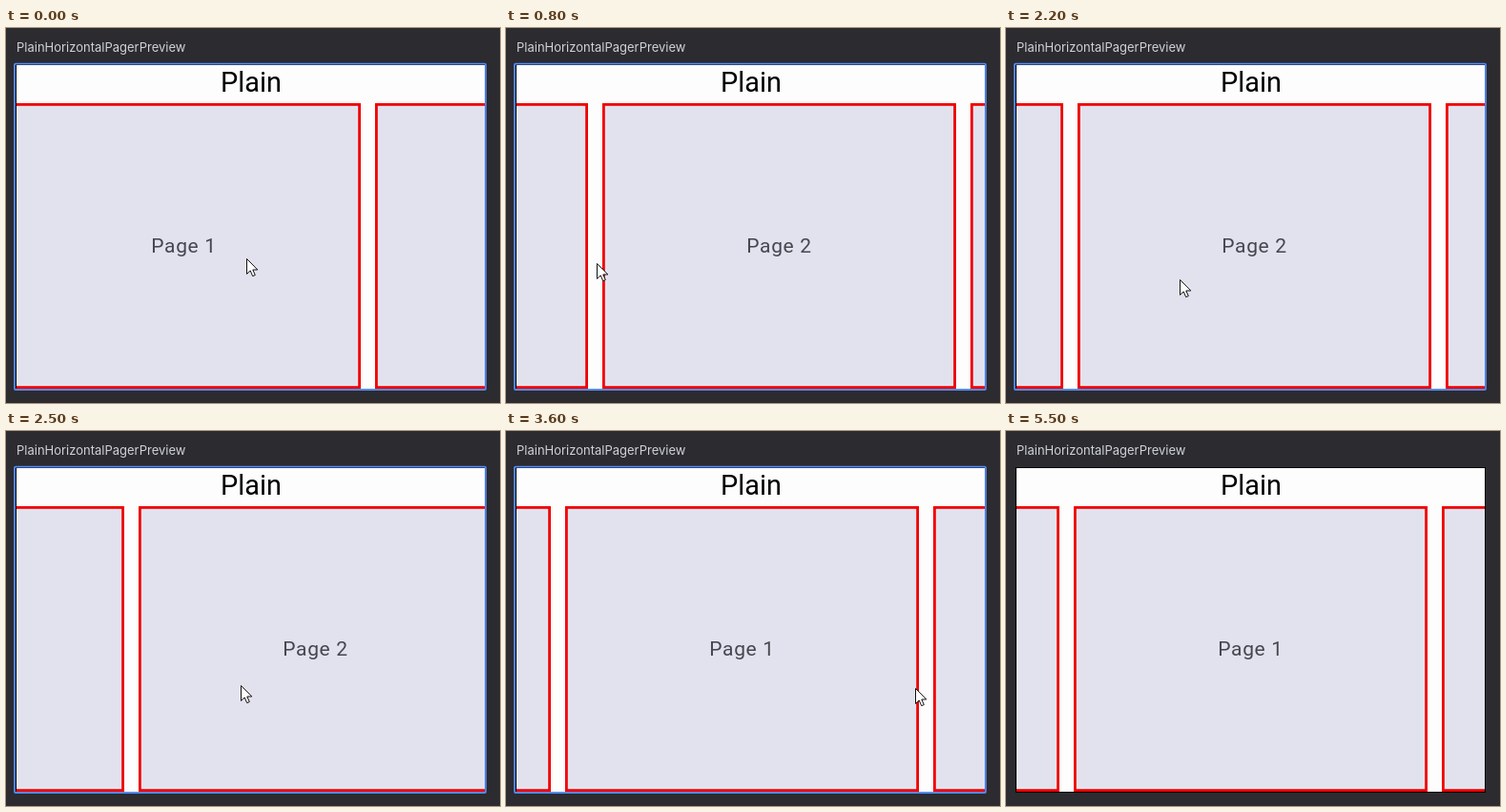
Write an HTML page that moves like this. It is 518 px wide and 394 px high and loops after 5.6 s.

```html
<!DOCTYPE html>
<html lang="en">
<head>
<meta charset="utf-8">
<title>Pager preview</title>
<style>
  html, body { margin: 0; width: 100%; height: 100%; overflow: hidden; background: #2b2b30; }
  svg { display: block; }
  text { font-family: Roboto, sans-serif; text-anchor: middle; }
  .name { font: 13px Inter, sans-serif; fill: #d0d2d8; text-anchor: start; }
  .label { font-size: 21px; letter-spacing: .656px; fill: #46464f; }
  .page rect { fill: #e2e2ee; stroke: #f00000; stroke-width: 2.8; }
</style>
</head>
<body>
<svg width="518" height="394" viewBox="0 0 518 394">
  <clipPath id="view"><rect x="11" y="39" width="491" height="340"/></clipPath>
  <text class="name" x="11" y="25">PlainHorizontalPagerPreview</text>
  <rect x="10" y="38" width="493" height="342"/>
  <rect x="11" y="39" width="491" height="340" fill="#fdfdfd"/>
  <text x="257" y="66.5" font-size="28.875">Plain</text>
  <g clip-path="url(#view)"><g id="pages"></g></g>
  <g id="hover">
    <rect x="9" y="37.6" width="494" height="342.4" rx="1" fill="none" stroke="#548af7" stroke-width="1.8"/>
    <path id="cursor" d="M.5 .5V16.5L4.2 13 6.7 18.7 9.3 17.6 6.8 12H11.8Z" fill="#fff" stroke="#111" stroke-width="1"/>
  </g>
</svg>
<script>
const LOOP = 5600, STEP = 100, LEAVE = 4400;
const PITCH = 386, WIDTH = 371, REST = 71;
const $ = id => document.getElementById(id);

// Two labelled pages with an empty neighbour on either side
$('pages').innerHTML = ['', 'Page 1', 'Page 2', ''].map((label, i) => `
  <g class="page" transform="translate(${(i - 1) * PITCH})">
    <rect x="1.4" y="80.4" width="${WIDTH - 2.8}" height="297.2"/>
    <text class="label" x="${WIDTH / 2}" y="236">${label}</text>
  </g>`).join('');

// Piecewise linear path through [time, ...values]
function along(keys, t) {
  const i = keys.findIndex(k => k[0] > t);
  if (i < 0) return keys[keys.length - 1].slice(1);
  const a = keys[i - 1], b = keys[i], p = (t - a[0]) / (b[0] - a[0]);
  return a.slice(1).map((v, n) => v + (b[n + 1] - v) * p);
}

// Critically damped snap
function snap(from, to, ms) {
  const w = ms * 0.02;
  return to + (from - to) * (1 + w) * Math.exp(-w);
}

const pointer = [
  [0, 252, 242], [645, 95, 247], [800, 95, 247], [1700, 136, 256],
  [2180, 178, 264], [2500, 246, 267], [3000, 351, 267],
  [3385, 429, 270], [3600, 429, 270], [4300, 451, 286]
];
const dragLeft = [[0, 1], [645, -155]];
const dragRight = [[2180, REST - PITCH], [2500, -247], [3000, -132], [3385, -54]];

function scroll(t) {
  if (t < 645) return along(dragLeft, t)[0];
  if (t < 2180) return snap(-155, REST - PITCH, t - 645);
  if (t < 3385) return along(dragRight, t)[0];
  return snap(-54, REST, t - 3385);
}

function draw(now) {
  const t = Math.floor(now % LOOP / STEP) * STEP;
  $('pages').setAttribute('transform', `translate(${Math.round(scroll(t))})`);
  const [x, y] = along(pointer, t).map(Math.round);
  $('cursor').setAttribute('transform', `translate(${x} ${y})`);
  $('hover').style.display = t < LEAVE ? '' : 'none';
}

const start = performance.now();
function tick() {
  draw(performance.now() - start);
  requestAnimationFrame(tick);
}
tick();
</script>
</body>
</html>
```
